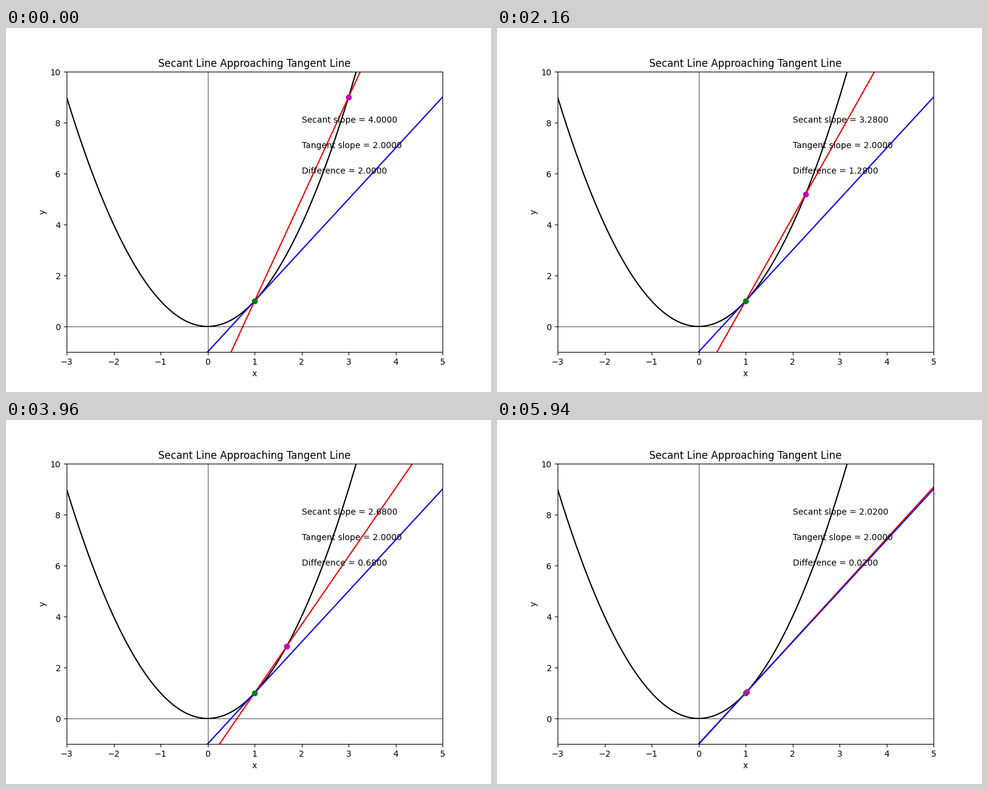
Write a matplotlib script that moves like this. It is 800 px wide and 600 px high and loops after 6000 ms.

```python
import numpy as np
import matplotlib.pyplot as plt
from matplotlib.animation import FuncAnimation

FRAMES = 100
INTERVAL = 60
X0 = 1.0
START_GAP = 2.0
TANGENT_SLOPE = 2 * X0


def f(x):
    return x ** 2


def line_through_p(slope):
    return f(X0) + slope * (x - X0)


plt.rcParams["font.family"] = "DejaVu Sans"
fig, ax = plt.subplots(figsize=(8, 6), dpi=100)
x = np.linspace(-3, 5, 400)

ax.plot(x, f(x), "k")
secant, = ax.plot([], [], "r")
ax.plot(x, line_through_p(TANGENT_SLOPE), "b")
ax.plot([X0], [f(X0)], "go")
moving_point, = ax.plot([], [], "mo")

ax.axhline(0, color="black", linewidth=0.5)
ax.axvline(0, color="black", linewidth=0.5)
ax.set_xlim(-3, 5)
ax.set_ylim(-1, 10)
ax.set_xlabel("x")
ax.set_ylabel("y")
ax.set_title("Secant Line Approaching Tangent Line")

secant_text = ax.text(2, 8, "")
ax.text(2, 7, f"Tangent slope = {TANGENT_SLOPE:.4f}")
diff_text = ax.text(2, 6, "")


def update(i):
    # The second point closes in on the fixed one at constant speed.
    gap = START_GAP * (1 - i / FRAMES)
    x1 = X0 + gap
    slope = (f(x1) - f(X0)) / gap
    secant.set_data(x, line_through_p(slope))
    moving_point.set_data([x1], [f(x1)])
    secant_text.set_text(f"Secant slope = {slope:.4f}")
    diff_text.set_text(f"Difference = {abs(slope - TANGENT_SLOPE):.4f}")
    return secant, moving_point, secant_text, diff_text


anim = FuncAnimation(fig, update, frames=FRAMES, interval=INTERVAL,
                     repeat=True, repeat_delay=0)
plt.show()
```
